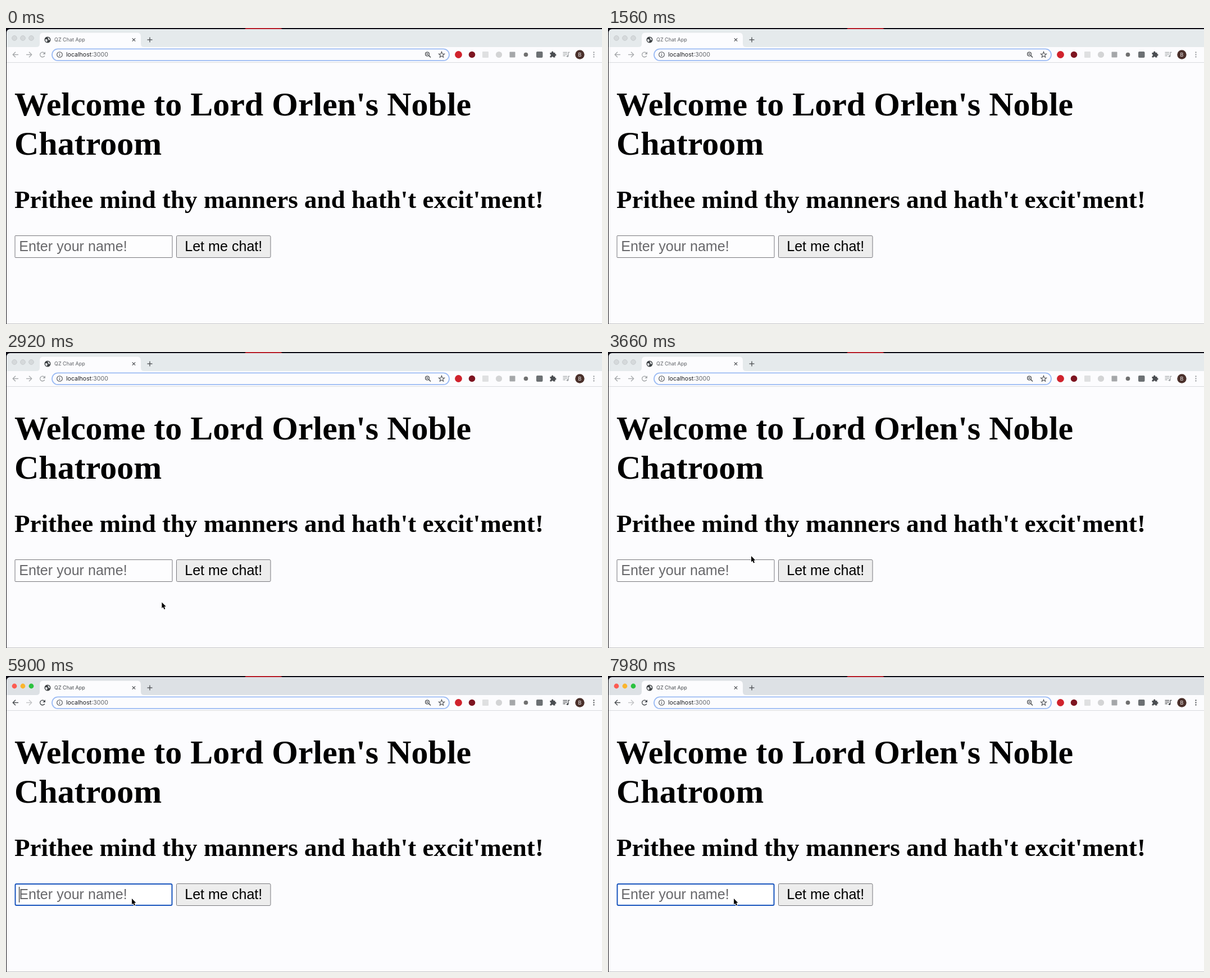
An HTML page with a canvas that plays this animation: 1061x528 px, repeating every 8 s.

```html
<!DOCTYPE html>
<html lang="en">
<head>
<meta charset="utf-8">
<title>Chatroom</title>
<style>
html, body { margin: 0; width: 100%; height: 100%; overflow: hidden; background: #fcfcfd; }
canvas { display: block; width: 1061px; height: 528px; }
</style>
</head>
<body>
<canvas id="stage" width="1061" height="528"></canvas>
<script>
const LOOP = 8000, CLICK = 5440, BLINK = 500;
const SERIF = '"Liberation Serif", "Times New Roman", serif';
const SANS = '"Liberation Sans", Arial, sans-serif';
const UI = 'Inter, Roboto, sans-serif';
const PAGE = '#fcfcfe', DARK = '#4a4d51';
const c = document.getElementById('stage').getContext('2d');

// Pointer path: time, x, y of the tip
const PATH = [
  [2600, 300, 530], [3240, 255, 364], [4780, 255, 364],
  [5060, 227, 394], [5300, 224, 397]
];

function rect(x, y, w, h, color) {
  c.fillStyle = color;
  c.fillRect(x, y, w, h);
}

function round(x, y, w, h, r, fill, stroke, width = 1) {
  c.beginPath();
  c.roundRect(x, y, w, h, r);
  if (fill) { c.fillStyle = fill; c.fill(); }
  if (stroke) { c.strokeStyle = stroke; c.lineWidth = width; c.stroke(); }
}

function disc(x, y, r, fill, stroke, width = 1) {
  c.beginPath();
  c.arc(x, y, r, 0, Math.PI * 2);
  if (fill) { c.fillStyle = fill; c.fill(); }
  if (stroke) { c.strokeStyle = stroke; c.lineWidth = width; c.stroke(); }
}

function line(color, width, ...pts) {
  c.beginPath();
  for (let i = 0; i < pts.length; i += 2) c.lineTo(pts[i], pts[i + 1]);
  c.strokeStyle = color;
  c.lineWidth = width;
  c.stroke();
}

function poly(fill, pts) {
  c.beginPath();
  pts.forEach(p => c.lineTo(p[0], p[1]));
  c.closePath();
  c.fillStyle = fill;
  c.fill();
}

function text(str, x, y, font, color, align = 'left') {
  c.font = font;
  c.fillStyle = color;
  c.textAlign = align;
  c.fillText(str, x, y);
}

function globe(x, y) {
  disc(x, y, 5.5, '#3c4043');
  poly('#e4e6e8', [[x - 4, y - 1], [x - 1, y - 1], [x, y + 1], [x - 1.5, y + 4.5], [x - 4, y + 2]]);
  poly('#e4e6e8', [[x, y - 4.5], [x + 3, y - 3], [x + 4.5, y], [x + 2, y + 1], [x + 1, y - 2]]);
}

function tabStrip(active) {
  rect(0, 0, 1061, 12, '#0c0b14');
  poly('#b8222d', [[427, 0], [489, 0], [492, 2], [425, 2]]);
  round(1, 2, 1061, 34, [6, 0, 0, 0], active ? '#dde1e5' : '#e5eaec');

  const lights = active ? ['#fc5b52', '#fbb52d', '#2bc23f'] : ['#d5d9db', '#d5d9db', '#d5d9db'];
  lights.forEach((color, i) => disc(15 + i * 15, 18, 4.4, color, active ? null : '#c3c7c9', 0.8));

  c.beginPath();
  c.moveTo(54, 34);
  c.quadraticCurveTo(60, 34, 60, 28);
  c.lineTo(60, 15);
  c.quadraticCurveTo(60, 8.5, 66, 8.5);
  c.lineTo(234, 8.5);
  c.quadraticCurveTo(240, 8.5, 240, 15);
  c.lineTo(240, 28);
  c.quadraticCurveTo(240, 34, 246, 34);
  c.fillStyle = PAGE;
  c.fill();

  globe(74, 21);
  text('QZ Chat App', 86, 24.3, '9px ' + UI, active ? '#45494d' : '#5c5f63');
  line(DARK, 1.2, 224.8, 18.3, 230.2, 23.7);
  line(DARK, 1.2, 230.2, 18.3, 224.8, 23.7);
  line(DARK, 1.3, 251.5, 21, 260.5, 21);
  line(DARK, 1.3, 256, 16.5, 256, 25.5);
}

function arrow(x, dir, color) {
  line(color, 1.4, x - 5 * dir, 47.5, x + 4.5 * dir, 47.5);
  line(color, 1.4, x, 42.8, x + 4.7 * dir, 47.5, x, 52.2);
}

function reload(color) {
  c.beginPath();
  c.arc(65, 47.5, 4.3, 0.5, 5.4);
  c.strokeStyle = color;
  c.lineWidth = 1.4;
  c.stroke();
  poly(color, [[70, 42.3], [70, 47], [65.3, 47]]);
}

function star(x, y) {
  c.beginPath();
  for (let i = 0; i < 10; i++) {
    const r = i % 2 ? 2.3 : 5.4, a = i * Math.PI / 5 - Math.PI / 2;
    c.lineTo(x + r * Math.cos(a), y + r * Math.sin(a));
  }
  c.closePath();
  c.strokeStyle = DARK;
  c.lineWidth = 1.1;
  c.stroke();
}

function puzzle(x, y) {
  rect(x - 5, y - 3, 9, 8.5, DARK);
  disc(x - 0.7, y - 3.6, 1.8, DARK);
  disc(x + 4.3, y + 1, 1.8, DARK);
  disc(x - 5, y + 1.3, 1.5, PAGE);
  disc(x - 0.7, y + 5.5, 1.5, PAGE);
}

function playlist(color) {
  [43.5, 46.5, 49.5].forEach((y, i) => line(color, 1.3, 991.5, y, i < 2 ? 999 : 996, y));
  line(color, 1.3, 1003.5, 43.3, 1001, 43.3, 1001, 50);
  disc(999.6, 50.3, 1.8, color);
}

function toolbar(active) {
  const tone = active ? '#45494d' : '#a3a6a9';
  rect(1, 34, 1060, 27, PAGE);
  rect(1, 61, 1060, 1, '#d9dbde');
  arrow(17, -1, tone);
  arrow(41, 1, active ? '#c1c3c5' : '#a9acaf');
  reload(tone);

  round(82, 37.3, 707, 20.8, 10.4, PAGE, '#9bbbf4', 1.8);
  disc(95.5, 47.5, 4.8, null, DARK, 1.1);
  rect(95, 46.8, 1.1, 3.4, DARK);
  rect(95, 44.6, 1.1, 1.2, DARK);
  const font = '10.6px ' + UI;
  text('localhost', 107, 51.2, font, '#1c1e21');
  text(':3000', 107 + c.measureText('localhost').width, 51.2, font, '#606468');
  disc(750, 46.5, 3.4, null, DARK, 1.3);
  line(DARK, 1.6, 752.5, 49, 756, 52.5);
  line(DARK, 1, 748.3, 46.5, 751.7, 46.5);
  line(DARK, 1, 750, 44.8, 750, 48.2);
  star(775.5, 47.8);

  disc(805.5, 47.5, 6.4, '#d0222c');
  disc(829.5, 47.5, 5.8, '#7d1420');
  round(848, 42, 11, 11, 1, '#dfe0e1');
  disc(877.5, 47.5, 5.6, '#d3d4d5');
  round(896.5, 42.5, 10, 10, 1, '#a5a7a9');
  disc(925.5, 47.5, 3.8, '#707070');
  round(944, 42, 11.5, 11, 2, '#6c7073');
  puzzle(973.5, 47);
  playlist(active ? DARK : '#a3a6a9');
  disc(1021.5, 47.5, 8.2, '#4a302b');
  text('B', 1021.5, 50.8, '9px ' + UI, '#f3eeee', 'center');
  [43.5, 47.5, 51.5].forEach(y => disc(1046.5, y, 1.15, active ? DARK : '#94979a'));
}

function page(active, caret) {
  rect(1, 62, 1060, 466, PAGE);
  const h1 = 'bold 60px ' + SERIF, field = '25.1px ' + SANS;
  text("Welcome to Lord Orlen's Noble", 15, 156, h1, '#000');
  text('Chatroom', 15, 226, h1, '#000');
  text("Prithee mind thy manners and hath't excit'ment!", 15, 321, 'bold 45.1px ' + SERIF, '#000');

  if (active) round(16.5, 371, 279, 38, 2, '#fff', '#1854bd', 2);
  else round(16, 370.5, 280, 39, 1, '#fdfdfe', '#77777c');
  text('Enter your name!', 23.2, 398, field, '#68686b');
  if (caret) rect(23, 376, 1, 28, '#111');

  round(303.5, 370.5, 167.5, 39, 2, '#ededed', '#77777c');
  text('Let me chat!', 318.2, 398, field, '#000');

  rect(0, 12, 1, 516, '#17161c');
  rect(1, 527, 1060, 1, '#c4c4c7');
}

function pointer(t) {
  if (t < PATH[0][0]) return;
  let [, x, y] = PATH[PATH.length - 1];
  for (let i = 1; i < PATH.length; i++) {
    const [t0, x0, y0] = PATH[i - 1], [t1, x1, y1] = PATH[i];
    if (t >= t1) continue;
    const k = (t - t0) / (t1 - t0), e = k * k * (3 - 2 * k);
    x = x0 + (x1 - x0) * e;
    y = y0 + (y1 - y0) * e;
    break;
  }
  c.save();
  c.translate(x, y);
  c.beginPath();
  [[0, 0], [0, 10.5], [2.4, 8.4], [4.1, 12.4], [6, 11.6], [4.3, 7.7], [7.4, 7.5]]
    .forEach(p => c.lineTo(p[0], p[1]));
  c.closePath();
  c.lineJoin = 'round';
  c.strokeStyle = '#fff';
  c.lineWidth = 1.6;
  c.stroke();
  c.fillStyle = '#000';
  c.fill();
  c.restore();
}

function draw(t) {
  const active = t >= CLICK;
  const caret = active && Math.floor((t - CLICK) / BLINK) % 2 === 0;
  tabStrip(active);
  toolbar(active);
  page(active, caret);
  pointer(t);
}

function tick() {
  draw(performance.now() % LOOP);
  requestAnimationFrame(tick);
}
tick();
</script>
</body>
</html>
```
